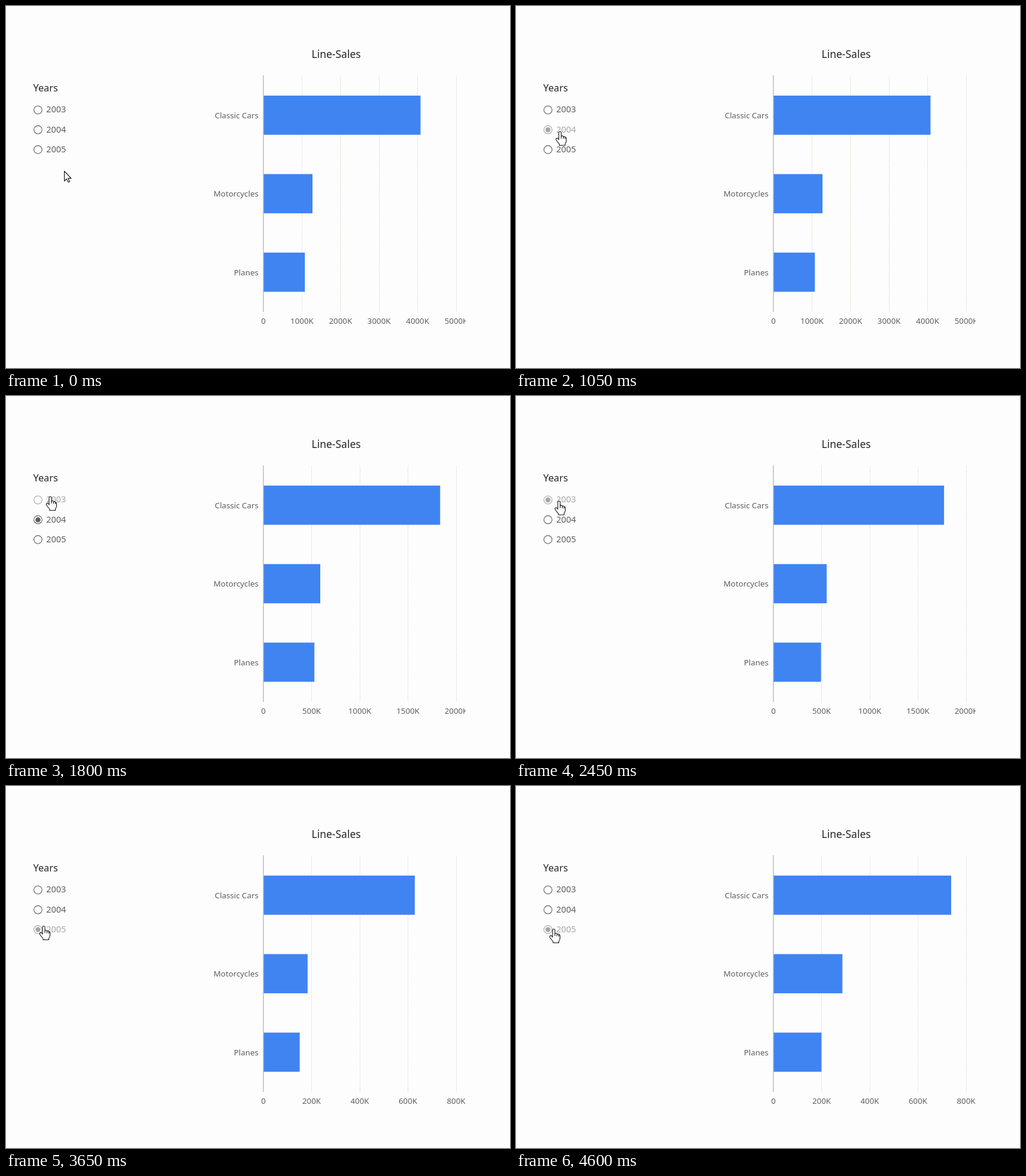
An HTML page with a canvas for the animation above (4.65 s loop, 842x606 px).

```html
<!DOCTYPE html>
<html lang="en">
<head>
<meta charset="utf-8">
<title>Line-Sales</title>
<style>
html, body { margin: 0; width: 842px; height: 606px; overflow: hidden; background: #fdfdfd; }
canvas { display: block; }
</style>
</head>
<body>
<canvas id="stage" width="842" height="606"></canvas>
<script>
const ctx = document.getElementById('stage').getContext('2d');
const LOOP = 4650, MORPH = 470, CLICK_LEAD = 100;
const PAPER = '#fdfdfd', INK = '#605e5c', TITLE = '#252423', BLUE = '#4084f2';
const LEFT = 430, RIGHT = 752;
const YEARS = ['2003', '2004', '2005'];
const LINES = ['Classic Cars', 'Motorcycles', 'Planes'];

// Bar widths in pixels; step and ticks describe the value axis
const views = [
  { start: -MORPH, year: -1, step: 1000, ticks: 5, bars: [262.5, 82, 69.3] },
  { start: 1112, year: 1, step: 500, ticks: 4, bars: [295.3, 95, 85.2] },
  { start: 2280, year: 0, step: 500, ticks: 4, bars: [242.4, 64, 56] },
  { start: 3480, year: 2, step: 200, ticks: 4, bars: [297, 115.3, 80.4] }
];

// Pointer tip: time, x, y
const path = [
  [0, 97, 276], [50, 97, 276], [450, 75, 212], [1350, 73, 209], [1550, 73, 209],
  [1800, 74, 168], [2350, 73, 168], [2800, 64, 226], [3650, 63, 234], [4600, 63, 239], [LOOP, 63, 239]
];

const hand = new Path2D('M-2 12V2Q-2 .5 0 .5T2 2V8Q5 6.5 5.5 9Q8 8 8.5 10Q10.5 9.5 10.5 12V16.5Q10 19 8.5 21V23.5H-1V21.5Q-4 18-6.5 14.5C-7.5 12-5 10.5-3.5 12L-2 14Z');
const creases = new Path2D('M2 8V12M5.5 9V12.5M8.5 10V13');
const arrow = new Path2D('M.5 .5V17L4.3 13.4L7 19L9.4 17.9L6.9 12.4H11.8Z');

const inOut = p => p < .5 ? 4 * p ** 3 : 1 - 4 * (1 - p) ** 3;
const clamp = p => Math.max(0, Math.min(1, p));
const mix = (a, b, p) => a + (b - a) * p;

function text(str, x, y, size, align = 'left', color = INK) {
  ctx.font = `${size}px "Noto Sans", "Open Sans", sans-serif`;
  ctx.textAlign = align;
  ctx.fillStyle = color;
  ctx.fillText(str, x, y);
}

function pointerAt(t) {
  const i = path.findIndex(p => p[0] > t);
  const [t0, x0, y0] = path[i - 1], [t1, x1, y1] = path[i];
  const p = (t - t0) / (t1 - t0), e = p * p * (3 - 2 * p);
  return [mix(x0, x1, e), mix(y0, y1, e)];
}

function drawYears(selected, hovered) {
  text('Years', 45.5, 143, 16.3, 'left', TITLE);
  YEARS.forEach((label, i) => {
    const y = 174 + i * 33.2;
    ctx.globalAlpha = i === hovered ? .55 : 1;
    ctx.strokeStyle = INK;
    ctx.lineWidth = 1.1;
    ctx.beginPath();
    ctx.arc(53.4, y, 6.8, 0, 7);
    ctx.stroke();
    if (i === selected) {
      ctx.fillStyle = INK;
      ctx.beginPath();
      ctx.arc(53.4, y, 4.2, 0, 7);
      ctx.fill();
    }
    text(label, 67.3, y + 4.4, 14.4);
  });
  ctx.globalAlpha = 1;
}

function drawChart(t) {
  const index = views.findLastIndex(v => t >= v.start);
  const view = views[index], old = views[Math.max(0, index - 1)];
  const grow = inOut(clamp((t - view.start) / MORPH));

  text('Line-Sales', 551.6, 87, 17.5, 'center', TITLE);
  ctx.save();
  ctx.beginPath();
  ctx.rect(0, 100, 767.5, 450);
  ctx.clip();
  ctx.lineWidth = 1;
  ctx.strokeStyle = '#e4e4da';
  ctx.setLineDash([3, 1]);
  for (let i = 0; i <= view.ticks; i++) {
    const x = mix(LEFT, RIGHT, i / view.ticks);
    if (i) {
      ctx.beginPath();
      ctx.moveTo(Math.floor(x) + .5, 117);
      ctx.lineTo(Math.floor(x) + .5, 512);
      ctx.stroke();
    }
    text(i ? i * view.step + 'K' : '0', x, 532, 13.3, 'center');
  }
  ctx.restore();

  LINES.forEach((label, i) => {
    const y = 150 + i * 131.4;
    ctx.fillStyle = BLUE;
    ctx.fillRect(LEFT, y, mix(old.bars[i], view.bars[i], grow), 65.6);
    text(label, 421.8, y + 38, 13.3, 'right');
  });
  ctx.fillStyle = '#b9b9b0';
  ctx.fillRect(429.3, 116, 1.4, 396);
}

function drawPointer(x, y, shape) {
  ctx.save();
  ctx.translate(x, y);
  ctx.fillStyle = '#fff';
  ctx.strokeStyle = '#111';
  ctx.lineWidth = 1.1;
  ctx.lineJoin = 'round';
  ctx.fill(shape);
  ctx.stroke(shape);
  if (shape === hand) ctx.stroke(creases);
  ctx.restore();
}

function frame(now) {
  const t = now % LOOP;
  const [x, y] = pointerAt(t);
  const row = Math.floor((y - 157) / 33.2);
  const selected = views.findLast(v => t >= v.start - CLICK_LEAD).year;
  ctx.fillStyle = PAPER;
  ctx.fillRect(0, 0, 842, 606);
  drawYears(selected, row);
  drawChart(t);
  drawPointer(x, y, row < YEARS.length ? hand : arrow);
  requestAnimationFrame(frame);
}
requestAnimationFrame(frame);
</script>
</body>
</html>
```
